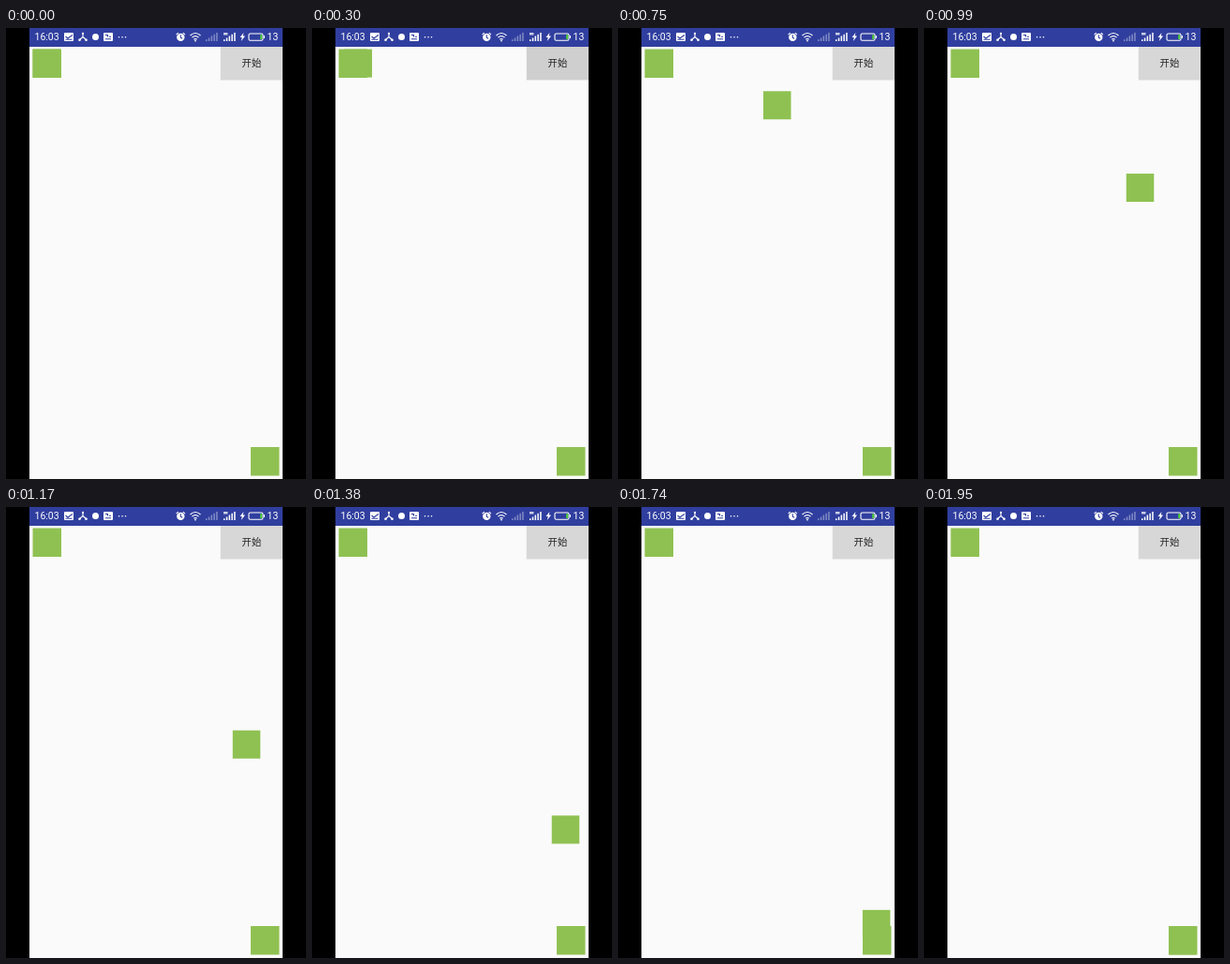
An HTML page for the animation above (1.98 s loop, 320 by 480 pixels).

```html
<!DOCTYPE html>
<html lang="zh">
<head>
<meta charset="utf-8">
<style>
  html, body { margin: 0; height: 100%; overflow: hidden; background: #000; }
  svg { display: block; width: 320px; height: 480px; }
  text { font-family: Roboto, "Noto Sans", sans-serif; font-size: 10.5px; fill: #fff; }
  .label { font-family: "Noto Sans CJK SC", "Noto Sans CJK", sans-serif; font-size: 10.4px; fill: #222; }
  .icon { fill: #8fc152; }
  .line { fill: none; stroke: #fff; stroke-width: 1.1; }
  .cut { fill: none; stroke: #303f9f; stroke-width: 1.1; }
</style>
</head>
<body>
<svg viewBox="0 0 320 480">
  <rect x="25" width="270" height="480" fill="#fafafa"/>
  <rect x="25" width="270" height="20" fill="#303f9f"/>

  <!-- status bar, left -->
  <text x="30.5" y="13.2">16:03</text>
  <g fill="#fff">
    <rect x="62" y="5" width="10" height="9" rx="1"/>
    <path class="cut" d="M63.5 9 l2.5 2 l2 -1.5 l3 -2 M63.5 12.3 h7"/>
    <path class="line" d="M82 5 v4.5 l-3.5 3 M82 9.5 l3.5 3"/>
    <circle cx="82" cy="5.8" r="1.1"/><circle cx="78.5" cy="12.7" r="1.3"/><circle cx="85.5" cy="12.7" r="1.3"/>
    <circle cx="95.5" cy="9.5" r="3.5"/>
    <rect x="104" y="5" width="10" height="9" rx="1"/>
    <path class="cut" d="M106 7.5 h2.5 v2 M106 11.8 h6 M110 9.3 h2"/>
    <circle cx="120.5" cy="9.7" r=".8"/><circle cx="124" cy="9.7" r=".8"/><circle cx="127.5" cy="9.7" r=".8"/>
  </g>

  <!-- status bar, right -->
  <g fill="#fff">
    <circle cx="186.3" cy="9.9" r="4.2"/>
    <path class="line" d="M181.6 7.2 l2.2 -2 M191 7.2 l-2.2 -2"/>
    <path class="cut" d="M186.3 7.3 v2.9 l1.8 1"/>
    <path class="line" d="M196.5 8 q5.5 -5 11 0 M198.4 10.2 q3.6 -3.2 7.2 0 M200.2 12.2 q1.8 -1.5 3.6 0"/>
    <circle cx="202" cy="13.5" r=".9"/>
    <path id="dim" opacity=".4"/>
    <path id="bright"/>
    <path d="M232 5 h4.5 v2.5 h-4.5z" opacity=".75"/>
    <path d="M253.5 5 l-4 5 h2.3 l-1 4 l4.3 -5.4 h-2.4z"/>
    <rect class="line" x="259" y="6" width="15" height="7.2" rx="1.5"/>
    <rect x="274.7" y="8" width="1.2" height="3"/>
    <rect x="271.2" y="7.2" width="2" height="4.8" fill="#4cd137"/>
  </g>
  <text x="278.5" y="13.2">13</text>

  <!-- button -->
  <rect x="228.5" y="20" width="66.5" height="36" fill="#e9e9e9"/>
  <rect id="button" x="229" y="20" width="66" height="35"/>
  <text class="label" x="262" y="40.8" text-anchor="middle">开始</text>

  <rect class="icon" x="28.5" y="22.5" width="30.5" height="30.5"/>
  <rect class="icon" x="261" y="446" width="30.5" height="30.5"/>
  <rect class="icon" id="mover" width="29.5" height="30"/>
</svg>
<script>
const LOOP = 1980, START = 195, END = 1950;
const get = id => document.getElementById(id);
const clamp = v => Math.min(1, Math.max(0, v));

const bars = x => [0, 1, 2, 3, 4]
  .map(i => `M${x + i * 2.8} 14 v${-1.8 - i * 1.8} h1.5 V14z`).join("");
get("dim").setAttribute("d", bars(213));
get("bright").setAttribute("d", bars(232));

// Ease in and out, slightly weighted towards the beginning
function ease(s) {
  const q = s * (1 - s);
  return (1 - Math.cos(Math.PI * (s + q * (0.188 + 0.61 * q)))) / 2;
}

function draw(now) {
  const ms = now % LOOP;
  const t = ease(clamp((ms - START) / (END - START)));
  // Quadratic curve whose control point is the top right corner
  const x = 28.5 + 232.5 * t * (2 - t);
  const y = 22.5 + 424 * t * t;
  get("mover").setAttribute("transform", `translate(${x} ${y})`);

  const press = ms < 540 ? clamp((ms - 30) / 150) : 0;
  const grey = Math.round(215 - 8 * press);
  get("button").setAttribute("fill", `rgb(${grey},${grey},${grey})`);
  requestAnimationFrame(draw);
}
draw(performance.now());
</script>
</body>
</html>
```
